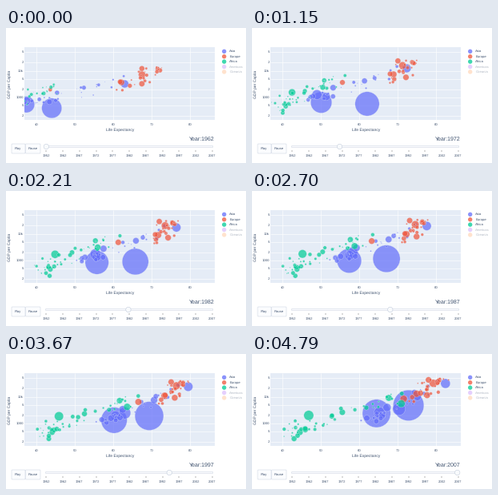
A matplotlib script for the animation above (4820 ms loop, 300 by 169 pixels).

```python
import numpy as np
import matplotlib.pyplot as plt
from matplotlib.animation import FuncAnimation
from matplotlib.patches import Circle, FancyBboxPatch, Rectangle

W, H, DPI = 300, 169, 100
PT = 72 / DPI  # points per pixel
STEP_MS, LOOP_MS = 20, 4820
INK, PAPER, RIM = "#2a3f5f", "#e5ecf6", "#bec8d9"
BLUE, RED, GREEN, PURPLE, ORANGE = "#636efa", "#ef553b", "#00cc96", "#ab63fa", "#ffa15a"

YEARS = np.array([1952, *range(1962, 2008, 5)])
AGE = (YEARS - 1952) / 55
KNOTS = (1952, 1977, 2007)

# A move to the next year begins every BEAT_MS and lasts MOVE_MS
BEAT_MS, LEAD_MS, MOVE_MS = 516, 93, 300
STARTS = np.maximum(np.arange(len(YEARS) - 1) * BEAT_MS - LEAD_MS, 0)

rng = np.random.default_rng(12)


def px(life):
    return 38 + 4.8 * (life - 40)


def py(gdp):
    return 87 - 33.5 * (np.log10(gdp) - 3)


def country(life, gdp, bend, pop, knots=KNOTS):
    """Pixel x, y and radius per year; bend shapes the growth of log GDP."""
    x = px(np.interp(YEARS, knots, life))
    y = py(gdp[0]) + (py(gdp[1]) - py(gdp[0])) * AGE ** bend
    r = 0.53 * np.sqrt(pop[0] + (pop[1] - pop[0]) * AGE)
    return x, y, r


def crowd(count, low, high, gdp_low, gdp_high, bend, top_pop, decay, growth, skew=1.0):
    """Seeded countries: wealth sets life and GDP, rank sets population."""
    result = []
    for rank in range(count):
        wealth = rng.random() ** skew
        life = np.add(low, np.subtract(high, low) * wealth) + rng.normal(0, 1.3, 3)
        log_gdp = np.add(gdp_low, np.subtract(gdp_high, gdp_low) * wealth) + rng.normal(0, 0.14)
        pop = top_pop * np.exp(-decay * rank)
        result.append(country(life, 10 ** log_gdp, bend * rng.uniform(0.8, 1.2),
                              (pop, pop * growth)))
    return result


asia = [
    country((44, 44.5, 58.4, 63.1, 73), (400, 4959), 1.8, (556, 1319),
            (1952, 1962, 1967, 1972, 2007)),
    country((37.4, 54.2, 64.7), (547, 2452), 2, (372, 1110)),
    country((37.5, 52.7, 70.7), (750, 3541), 1, (82, 224)),
    country((63, 75.4, 82.6), (3217, 31656), 0.5, (86, 127)),
    country((43.4, 54, 65.5), (685, 2606), 1, (41, 169)),
    *crowd(28, (38, 49, 62), (62, 72, 80), (2.7, 3), (3.7, 4.5), 0.85, 30, 0.15, 3),
]
europe = [
    country((43.6, 59.5, 71.8), (1969, 8458), 0.8, (22, 71)),
    country((67.5, 72.5, 79.4), (7144, 32170), 0.6, (69, 82)),
    *crowd(28, (60, 69, 73), (72, 75.5, 81), (3.35, 3.9), (4.05, 4.6), 0.65, 52, 0.13, 1.25, 0.6),
]
africa = [
    country((36.3, 44.5, 46.9), (1077, 2014), 0.5, (33, 135)),
    country((41.9, 53.3, 71.3), (1419, 5581), 0.9, (22, 80)),
    *crowd(50, (33, 41, 42), (45, 58, 72), (2.65, 2.65), (3.45, 4.1), 0.7, 18, 0.08, 3.2, 1.6),
]

plt.rcParams.update({"font.family": "Liberation Sans", "text.hinting": "none"})
fig = plt.figure(figsize=(W / DPI, H / DPI), dpi=DPI, facecolor="white")
ax = fig.add_axes([0, 0, 1, 1])
ax.set(xlim=(0, W), ylim=(H, 0))
ax.axis("off")


def text(x, y, s, size=4.3, ha="center", alpha=0.9, **kw):
    return ax.text(x, y, s, fontsize=size * PT, ha=ha, va="center", color=INK, alpha=alpha, **kw)


def line(xs, ys, color, width):
    ax.plot(xs, ys, color=color, lw=width * PT, zorder=1, solid_capstyle="butt")


def box(x, y, w, h):
    ax.add_patch(FancyBboxPatch((x, y), w, h, boxstyle="round,pad=0,rounding_size=0.8",
                                fc="#fbfcfe", ec=RIM, lw=0.4 * PT, zorder=2))


# Plot area with grid and axis labels
X0, X1, Y0, Y1 = 22.5, 261, 24.2, 115
panel = Rectangle((X0, Y0), X1 - X0, Y1 - Y0, fc=PAPER, ec="none", zorder=0)
ax.add_patch(panel)
for life in range(40, 81, 10):
    line([px(life)] * 2, [Y0, Y1], "white", 0.6)
    text(px(life), 121, str(life))
for decade in (100, 1000, 10000):
    for digit in (1, 2, 5):
        gdp = decade * digit
        if gdp == 100:
            continue
        label = str(digit) if digit > 1 else {1000: "1000", 10000: "10k"}[gdp]
        line([X0, X1], [py(gdp)] * 2, "white", 0.6)
        text(22, py(gdp), label, ha="right")
text(142.5, 128, "Life Expectancy", 4.95)
text(4.5, 70, "GDP per Capita", 4.95, rotation=90)

# Legend
for i, (name, color, alpha) in enumerate((
        ("Asia", BLUE, 1), ("Europe", RED, 1), ("Africa", GREEN, 1),
        ("Americas", PURPLE, 0.4), ("Oceania", ORANGE, 0.4))):
    y = 29.3 + 6.4 * i
    ax.add_patch(Circle((272.7, y), 2.7, fc=color, ec="none", alpha=0.75 * alpha))
    text(279.3, y, name, ha="left", alpha=0.9 * alpha)

# Buttons and slider
box(7, 145, 17, 12)
box(24.5, 145, 18.5, 12)
text(15.2, 151, "Play")
text(33.8, 151, "Pause")
RAIL_X, RAIL_STEP, RAIL_Y = 50.3, 20.75, 148.5
box(RAIL_X - 1, RAIL_Y - 0.9, 10 * RAIL_STEP + 2, 1.8)
for i, year in enumerate(YEARS):
    x = RAIL_X + RAIL_STEP * i
    line([x, x], [152.5, 154.5], "#444444", 0.4)
    text(x, 160, str(year))
grip = Circle((RAIL_X, RAIL_Y), 3.2, fc="#f8fafc", ec=RIM, lw=0.5 * PT, zorder=4)
ax.add_patch(grip)
year_label = text(261, 138.7, "", 6.95, ha="right")

groups = []
for z, (paths, color) in enumerate(((asia, BLUE), (europe, RED), (africa, GREEN))):
    dots = ax.scatter([], [], color=color, edgecolors=PAPER, linewidths=0.35 * PT,
                      alpha=0.72, zorder=5 + z)
    dots.set_clip_path(panel)
    groups.append((dots, np.array(paths)))


def ease(u, power):
    return 0.5 * (2 * u) ** power if u < 0.5 else 1 - 0.5 * (2 - 2 * u) ** power


def draw(i):
    t = i * STEP_MS
    k = np.searchsorted(STARTS, t, side="right") - 1
    u = min((t - STARTS[k]) / MOVE_MS, 1)
    p = ease(u, 2)
    for dots, paths in groups:
        x, y, r = ((1 - p) * paths[:, :, k] + p * paths[:, :, k + 1]).T
        dots.set_offsets(np.column_stack((x, y)))
        dots.set_sizes((2 * r * PT) ** 2)
    grip.center = (RAIL_X + RAIL_STEP * (k + ease(u, 3)), RAIL_Y)
    year_label.set_text(f"Year:{YEARS[k + 1]}")
    return [dots for dots, _ in groups] + [grip, year_label]


anim = FuncAnimation(fig, draw, frames=LOOP_MS // STEP_MS, interval=STEP_MS,
                     repeat=True, repeat_delay=0, blit=False)
plt.show()
```
